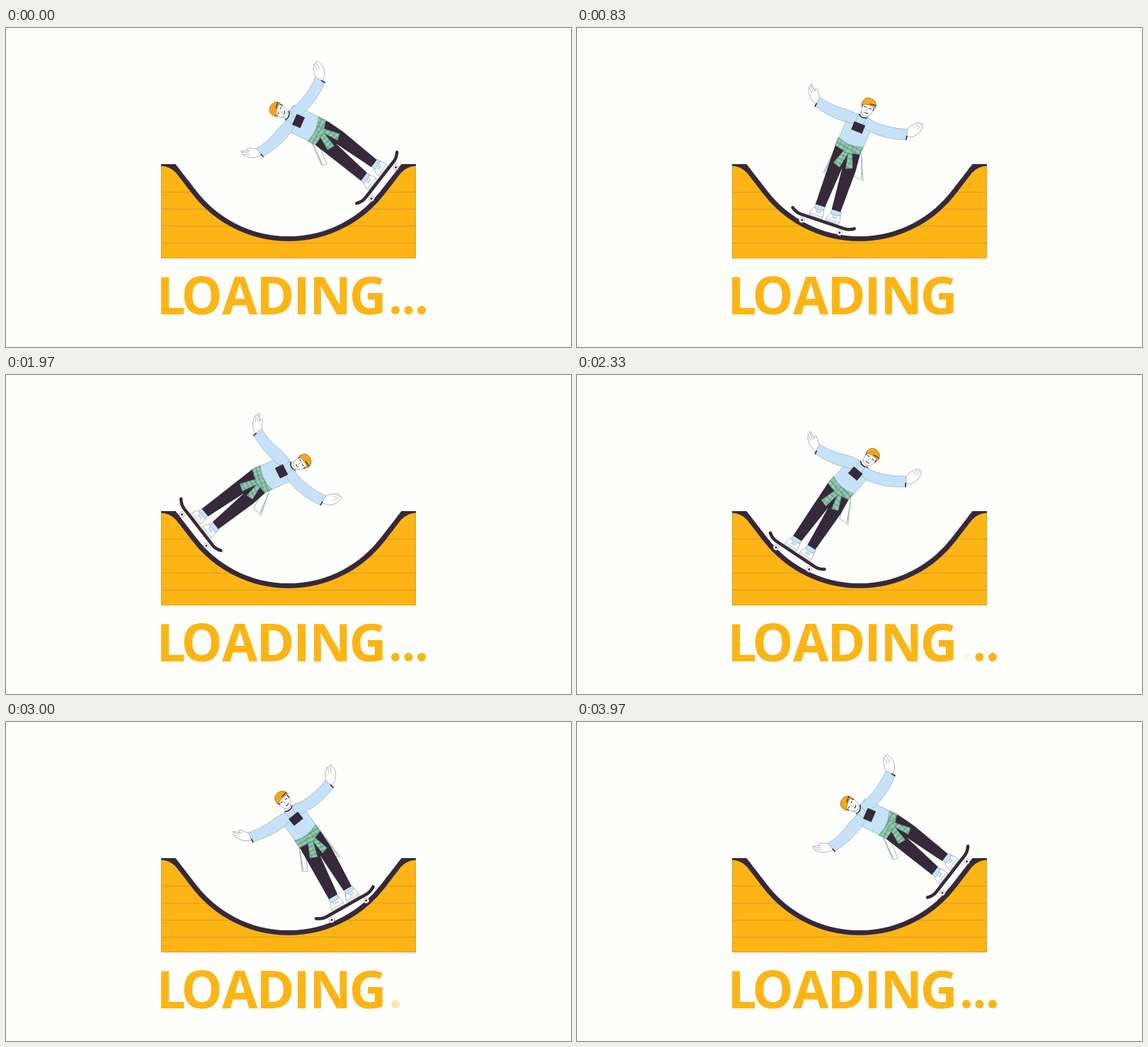
Recreate the animation shown at these times as an HTML page. Size 798 by 450 pixels, loop 4.01 s.

```html
<!DOCTYPE html>
<html lang="en">
<head>
<meta charset="utf-8">
<title>Loading</title>
<style>
  html, body { margin: 0; width: 100%; height: 100%; overflow: hidden; background: #fefefd; }
  svg { display: block; width: 798px; height: 450px; }
  .ink { fill: #35293a; }
  .line { fill: none; stroke: #35293a; stroke-linecap: round; stroke-linejoin: round; }
  .skin, .coat { fill: #fefefd; stroke: #9a9c9c; stroke-width: .7; stroke-linejoin: round; }
  .shirt { fill: #c5e2f9; stroke: #93a8b6; stroke-width: .6; stroke-linejoin: round; }
  .plaid { fill: url(#check); stroke: #5b8f78; stroke-width: .6; stroke-linejoin: round; }
  .sock { fill: #c5e2f9; stroke: #8fa3ae; stroke-width: .6; }
  .orange { fill: #fcb514; }
  text { font: 700 73px "Open Sans", "Noto Sans", sans-serif; fill: #fcb514; }
</style>
</head>
<body>
<svg viewBox="0 0 798 450">
  <defs>
    <pattern id="check" width="6" height="6" patternUnits="userSpaceOnUse" patternTransform="rotate(8)">
      <rect width="6" height="6" fill="#8ac4aa"/>
      <path d="M0 1.5H6M1.5 0V6" stroke="#649a82" stroke-width="1"/>
      <path d="M0 4.5H6" stroke="#b2dac6" stroke-width=".7"/>
    </pattern>
    <path id="slope" d="M219 193Q231 194 240 200L266 232A168 168 0 0 0 532 232L558 200Q567 194 579 193V325H219Z"/>
    <clipPath id="inside"><use href="#slope"/></clipPath>
    <path id="lip" class="ink" d="M219 192H239.400L245 199L239 203.400Q231 195 219 194.500Z"/>
    <g id="shoe">
      <path class="sock" d="M383 261H396L397 270H382Z"/>
      <path class="skin" d="M382 267Q389 271 396 266L398 273V279H378.500Q378 273 382 267Z"/>
      <path d="M379 276.500H398M385 270L393 273M386 273L393 270" fill="none" stroke="#a3bdca" stroke-width=".9"/>
    </g>
    <g id="wheel">
      <circle cx="371.500" cy="289.500" r="3.900" class="skin"/>
      <circle cx="371.500" cy="289.500" r="1.500" class="ink"/>
    </g>
  </defs>

  <use href="#slope" class="orange"/>
  <path d="M219 231.500H579M219 255.500H579M219 279.500H579M219 303.500H579" stroke="#cf9527" stroke-width=".8" clip-path="url(#inside)"/>
  <use href="#lip"/>
  <use href="#lip" transform="matrix(-1 0 0 1 798 0)"/>
  <path class="line" style="stroke-linecap:butt" stroke-width="7" d="M241.500 200.300L266 232A168 168 0 0 0 532 232L556.500 200.300"/>
  <path d="M219.500 195V324.500H578.500V195" fill="none" stroke="#cf9527" stroke-width=".7"/>

  <text x="212.5 247.5 305 353.5 405.5 428.5 484.8" y="404">LOADING</text>
  <g id="dots" class="orange">
    <circle cx="550" cy="398" r="6"/>
    <circle cx="568.500" cy="398" r="6"/>
    <circle cx="587" cy="398" r="6"/>
  </g>

  <g id="rider">
    <use href="#wheel"/>
    <use href="#wheel" x="56"/>
    <path class="line" stroke-width="4.500" d="M353.500 277Q360 282 367 282H432Q439 282 445.500 277.500"/>
    <use href="#shoe"/>
    <use href="#shoe" x="24.500"/>

    <g id="body">
      <g id="tails">
        <path class="coat" d="M386 172L375.500 214L383 216.500L392 178Z"/>
        <path class="coat" d="M421 172L433 213L419 210L414 178Z"/>
        <path d="M384 181L377.500 213M424 181L430.500 211" fill="none" stroke="#9cc7b3" stroke-width="1.500"/>
      </g>
      <path class="ink" d="M384 172H421L422.500 200L419.500 262H406.500L403 202L396.500 262H382.500Z"/>

      <g id="torso">
        <path class="skin" d="M400.500 114V125Q406 130 411 124V114Z"/>
        <path class="shirt" d="M399 122.500Q405 128 412 122.500L423 125L421.500 170H384.500L386 127Z"/>
        <path class="line" stroke-width="1.500" d="M399 122.500Q405 127.500 412 122.500"/>

        <g id="armL">
          <path class="skin" d="M340 129L334 124Q330 118 327 118.500Q326 120 328 123L319 116.500Q317 117 318.500 119L317.500 122Q318.500 127 323 131Q328 137 339 139Z"/>
          <path d="M319 118.500L326 125M318.500 122L325 128" fill="none" stroke="#9a9c9c" stroke-width=".6"/>
          <path class="shirt" d="M397 123Q383 123 367 127Q353 129 338 127.500L337.500 141.500Q365 146 389 140L400 136Z"/>
          <path class="line" stroke-width="1.600" d="M338.200 137.500V142"/>
        </g>
        <g id="armR">
          <path class="skin" d="M470 117Q468 111 471 107Q474 102 476.500 99L479 96.500L481 97L484 96Q487 96 486.500 100L487 106Q486 113 481 118L474 122Z"/>
          <path d="M479.500 98L477.500 106M483.500 97L481 107" fill="none" stroke="#9a9c9c" stroke-width=".6"/>
          <path class="shirt" d="M411 123Q427 125 443 121Q457 118 469 112L474.500 126Q449 139 421 139L409 136Z"/>
          <path class="line" stroke-width="1.600" d="M472.500 121.500L474.200 126"/>
        </g>
        <rect class="ink" x="396.500" y="134" width="16.500" height="12.500"/>

        <g id="head">
          <path class="skin" d="M399 104V113Q401 122 407 122Q414 121 415.500 112V104Z"/>
          <path class="line" stroke-width="1" d="M401.500 109.500H404.500M409.500 109.500H412.500M405 117Q407.500 118.500 410 116.500"/>
          <path d="M407 109L406 114H408" fill="none" stroke="#9a9c9c" stroke-width=".7"/>
          <path class="line" stroke-width="1.300" d="M399 107V110.500M415.500 107V110.500"/>
          <path d="M397 106Q397 96 406 95.500Q417 95.500 417.500 106Q407 103.500 397 108.500Z" fill="#f3a81b" stroke="#8a6420" stroke-width=".6"/>
          <path class="line" stroke-width="1.200" d="M408 103.500L416.500 102.500"/>
        </g>

        <path class="plaid" d="M384 163.500Q402 171 421 164L421.500 175Q402 181 383.500 175.500Z"/>
      </g>
      <path class="plaid" d="M400 172L389 198L399 202L404.500 180L408 201L417 198L408 172Z"/>
      <path class="plaid" d="M397.500 169L409 168.500L410 179L398.500 180Z"/>
    </g>
  </g>
</svg>

<script>
const $ = id => document.getElementById(id);
const LOOP = 4010, HALF = 2000;
const clamp = v => Math.max(0, Math.min(1, v));

// cubic-bezier(.25, 0, .25, 1)
function ease(x) {
  let lo = 0, hi = 1;
  for (let i = 0; i < 24; i++) {
    const s = (lo + hi) / 2;
    if (.75 * s * (1 - s) + s * s * s < x) lo = s; else hi = s;
  }
  return lo * lo * (3 - 2 * lo);
}

// -1 at the right end of the ramp, 1 at the left end
function swing(ms, lead = 0) {
  const back = ms >= HALF;
  const p = 2 * ease(clamp((ms % HALF + lead) / HALF)) - 1;
  return back ? -p : p;
}

function turn(id, deg, x, y) {
  $(id).setAttribute("transform", `rotate(${deg} ${x} ${y})`);
}

function pose(ms) {
  const p = swing(ms), arm = swing(ms, 100);
  const phi = 56 * p * Math.PI / 180;
  const dx = -150 * Math.sin(phi), dy = 150 * (Math.cos(phi) - 1);
  const board = 52 * p, torso = 65 * p - 1.5;
  $("rider").setAttribute("transform",
    `translate(${dx} ${dy}) rotate(${board} 399.5 277.5)`);
  turn("body", -1, 401, 262);
  turn("tails", -16 * p, 403, 175);
  turn("torso", torso - board + 1, 403, 175);
  turn("armL", 6 + 46 * arm - torso, 394, 129);
  turn("armR", 4 + 46 * arm - torso, 414, 129);
  turn("head", -2 * p, 406, 121);

  const u = ms % HALF;
  [...$("dots").children].forEach((dot, i) => {
    const out = clamp((u - 150 - 200 * i) / 200);
    const back = clamp((u - 933 - 200 * i) / 200);
    dot.setAttribute("opacity", 1 - out + back);
  });
}

const start = performance.now();
function tick() {
  const t = (performance.now() - start) % LOOP;
  const step = Math.min(119, Math.floor((t + 3.5) * 30 / 1000));
  pose(step * 1000 / 30);
  requestAnimationFrame(tick);
}
tick();
</script>
</body>
</html>
```
